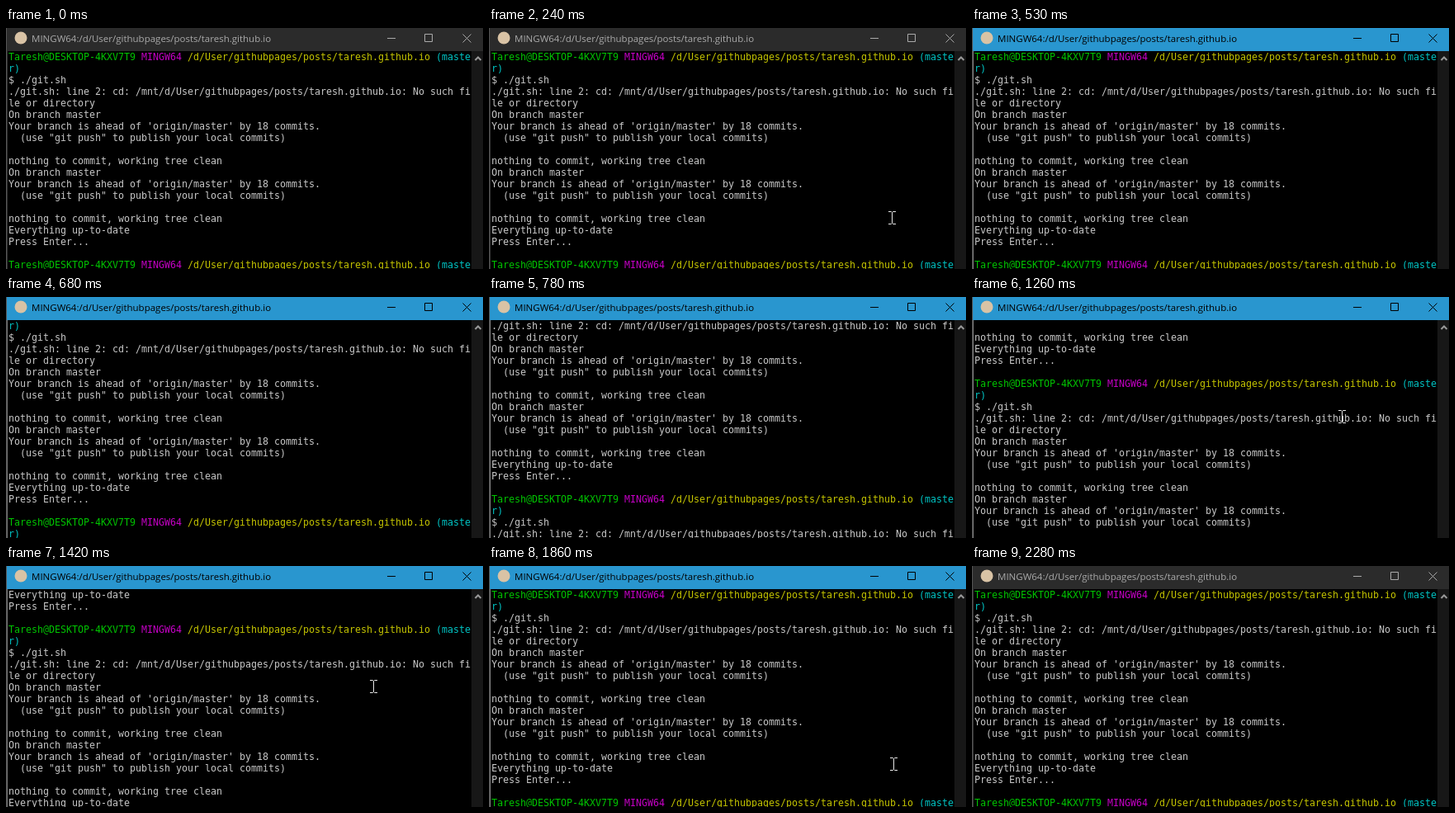
These frames come from a looping animation (578 by 292 pixels, 2.34 s). An HTML page:

```html
<!DOCTYPE html>
<html lang="en">
<head>
<meta charset="utf-8">
<title>Terminal</title>
<style>
  html, body { margin: 0; width: 100%; height: 100%; overflow: hidden; background: #000; }
  #stage { position: absolute; left: 0; top: 0; width: 578px; height: 292px; overflow: hidden; background: #000; }
  #stage > * { position: absolute; }
  #bar { left: 1px; top: 0; width: 577px; height: 28px; background: #2b2b2b; color: #aaa; }
  #bar span {
    position: absolute; left: 30px; top: 4px; white-space: pre;
    font: 11.5px/17px "Open Sans", "Noto Sans", sans-serif;
  }
  #bar svg { position: absolute; left: 0; top: 0; }
  #edge { left: 0; top: 0; width: 1px; height: 292px; background: #555; }
  #side { left: 1px; top: 28px; width: 1px; height: 264px; background: #303030; }
  .on #bar { background: #2996cf; color: #000; }
  .on #side { background: #777; }
  #view { left: 3px; top: 28px; width: 561px; height: 264px; overflow: hidden; }
  #log {
    margin: 0; color: #c8c8c8;
    font: 11.63px/14px "DejaVu Sans Mono", "Liberation Mono", monospace;
    font-variant-ligatures: none;
  }
  #log div { height: 14px; white-space: pre; }
  .g { color: #00c400; }
  .m { color: #c400c4; }
  .y { color: #c4c400; }
  .c { color: #00c4c4; }
  #scroll { left: 564px; top: 28px; width: 14px; height: 264px; background: #171717; }
  #beam { left: 0; top: 0; }
</style>
</head>
<body>
<div id="stage">
  <div id="view"><pre id="log"></pre></div>
  <div id="scroll">
    <svg width="14" height="20" fill="none" stroke="#999" stroke-width="2">
      <path d="M4.500 11L8 7.500L11.500 11"/>
    </svg>
  </div>
  <div id="side"></div>
  <div id="bar">
    <svg width="577" height="28" fill="none" stroke="currentColor">
      <circle cx="17" cy="12" r="7.5" fill="#d9c3a5" stroke="none"/>
      <path d="M461 12.500h10M506.500 7.500h9v9h-9zM552.500 7.500l10 10M562.500 7.500l-10 10"/>
    </svg>
    <span>MINGW64:/d/User/githubpages/posts/taresh.github.io</span>
  </div>
  <div id="edge"></div>
  <svg id="beam" width="11" height="18" fill="none" stroke="#e8e8e8">
    <path d="M1 1.500h3.500l1 1l1-1h3.500M5.500 2v14M1 16.500h3.500l1-1l1 1h3.500"/>
  </svg>
</div>
<script>
const LOOP = 2340, ROW = 14, STEP = 80, FIRST = 60;
const el = id => document.getElementById(id);
const tint = (cls, text) => `<span class="${cls}">${text}</span>`;

const path = '/d/User/githubpages/posts/taresh.github.io';
const status = [
  'On branch master',
  "Your branch is ahead of 'origin/master' by 18 commits.",
  '  (use "git push" to publish your local commits)',
  '',
  'nothing to commit, working tree clean'
];
const run = [
  [tint('g', 'Taresh@DESKTOP-4KXV7T9'), tint('m', 'MINGW64'), tint('y', path), tint('c', '(maste')].join(' '),
  tint('c', 'r)'),
  '$ ./git.sh',
  `./git.sh: line 2: cd: /mnt${path}: No such fi`,
  'le or directory',
  ...status, ...status,
  'Everything up-to-date',
  'Press Enter...',
  ''
];
el('log').innerHTML = [...run, ...run, ...run].map(line => `<div>${line}</div>`).join('');

// Key points: time, then the values at that time
const scroll = [[540, 0], [780, 3], [1260, 13], [1660, run.length]];
const enter = [[60, 515, 286], [460, 448, 145]];
const leave = [[1180, 449, 144], [1660, 441, 148], [1820, 490, 240], [2140, 515, 288]];

// Whole-pixel or whole-line values between key points, held outside them
function between(keys, t) {
  const i = keys.findIndex(key => key[0] > t);
  if (i === 0) return keys[0].slice(1);
  if (i < 0) return keys.at(-1).slice(1);
  const [a, b] = [keys[i - 1], keys[i]];
  const k = (t - a[0]) / (b[0] - a[0]);
  return a.slice(1).map((v, n) => Math.round(v + (b[n + 1] - v) * k));
}

function draw(t) {
  const tick = FIRST + Math.floor((t - FIRST) / STEP) * STEP;
  el('stage').classList.toggle('on', t >= 330 && t < 2280);

  const [line] = between(scroll, tick);
  el('log').style.transform = `translateY(${-ROW * line}px)`;

  const entering = t >= 60 && t < 530;
  const leaving = t >= 1180 && t < 2200;
  const [x, y] = between(entering ? enter : leave, tick);
  el('beam').style.visibility = entering || leaving ? 'visible' : 'hidden';
  el('beam').style.transform = `translate(${x - 5}px, ${y - 9}px)`;
}

const start = performance.now();
function play() {
  draw((performance.now() - start) % LOOP);
  requestAnimationFrame(play);
}
play();
</script>
</body>
</html>
```
